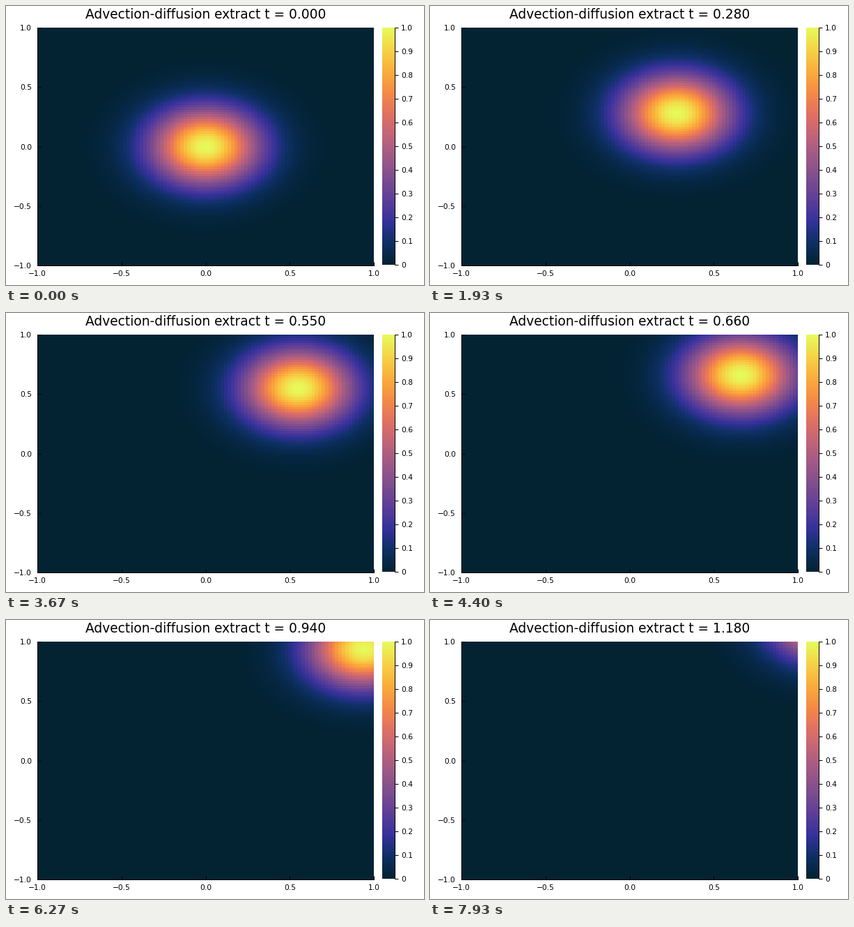
A matplotlib script for the animation above (8 s loop, 600 by 400 pixels).

```python
import numpy as np
import matplotlib.pyplot as plt
from matplotlib.animation import FuncAnimation
from matplotlib.colors import LinearSegmentedColormap

W, H, DPI = 600, 400, 100
FRAMES, LOOP_MS = 120, 8000
DT = 0.01        # simulated time per frame
SPREAD = 0.1     # squared width of the Gaussian
STEP = 0.02      # grid spacing

PX = 72 / DPI    # points per pixel
plt.rcParams.update({"font.family": "DejaVu Sans", "axes.unicode_minus": True})

THERMAL = LinearSegmentedColormap.from_list("thermal", [
    "#032333", "#0d3064", "#35329b", "#5d3e99", "#7e4d8f", "#9e5987",
    "#c16479", "#e17161", "#f68b45", "#fbad3c", "#f6d346", "#e7fa5a"])

fig = plt.figure(figsize=(W / DPI, H / DPI), dpi=DPI, facecolor="white")


def axes_px(left, top, right, bottom):
    return fig.add_axes([left / W, 1 - bottom / H,
                         (right - left) / W, (bottom - top) / H])


def label(x, y, text, size=10.67, ha="center"):
    return fig.text(x / W, 1 - y / H, text, fontsize=size * PX,
                    ha=ha, va="baseline")


def frame_style(ax, shown):
    for side, spine in ax.spines.items():
        spine.set_visible(side in shown)
        spine.set_linewidth(PX)


grid = np.linspace(-1, 1, round(2 / STEP) + 1)


def field(t):
    bump = np.exp(-(grid - t) ** 2 / SPREAD)
    return np.outer(bump, bump)


# Main heatmap
ax = axes_px(45, 31, 528, 372)
edge = 1 + STEP / 2
heat = ax.imshow(field(0), cmap=THERMAL, vmin=0, vmax=1, origin="lower",
                 extent=[-edge, edge, -edge, edge], aspect="auto",
                 interpolation="nearest")
ticks = np.linspace(-1, 1, 5)
ax.set(xlim=(-1, 1), ylim=(-1, 1), xticks=ticks, yticks=ticks)
ax.tick_params(direction="in", length=5 * PX, width=PX,
               labelbottom=False, labelleft=False)
frame_style(ax, ("left", "bottom"))
for v in ticks:
    name = f"{v:.1f}".replace("-", "\u2212")
    label(286.5 + 241.5 * v, 387, name)
    label(37, 205.5 - 170.5 * v, name, ha="right")

# Colour bar
bar = axes_px(540, 31, 558, 371)
bar.imshow(np.linspace(0, 1, 256)[:, None], cmap=THERMAL, vmin=0, vmax=1,
           origin="lower", extent=[0, 1, 0, 1], aspect="auto")
levels = np.linspace(0, 1, 11)
bar.set(xticks=[], yticks=levels)
bar.yaxis.tick_right()
bar.tick_params(axis="y", length=5 * PX, width=PX, labelright=False)
frame_style(bar, ("right",))
for v in levels:
    label(567, 375 - 340 * v, f"{v:.1f}" if v else "0", ha="left")

title = label(286.5, 18, "", size=18.67)


def update(i):
    t = i * DT
    heat.set_data(field(t))
    title.set_text(f"Advection-diffusion extract t = {t:.3f}")
    return heat, title


anim = FuncAnimation(fig, update, frames=FRAMES, interval=LOOP_MS / FRAMES,
                     repeat=True, repeat_delay=0)
plt.show()
```
